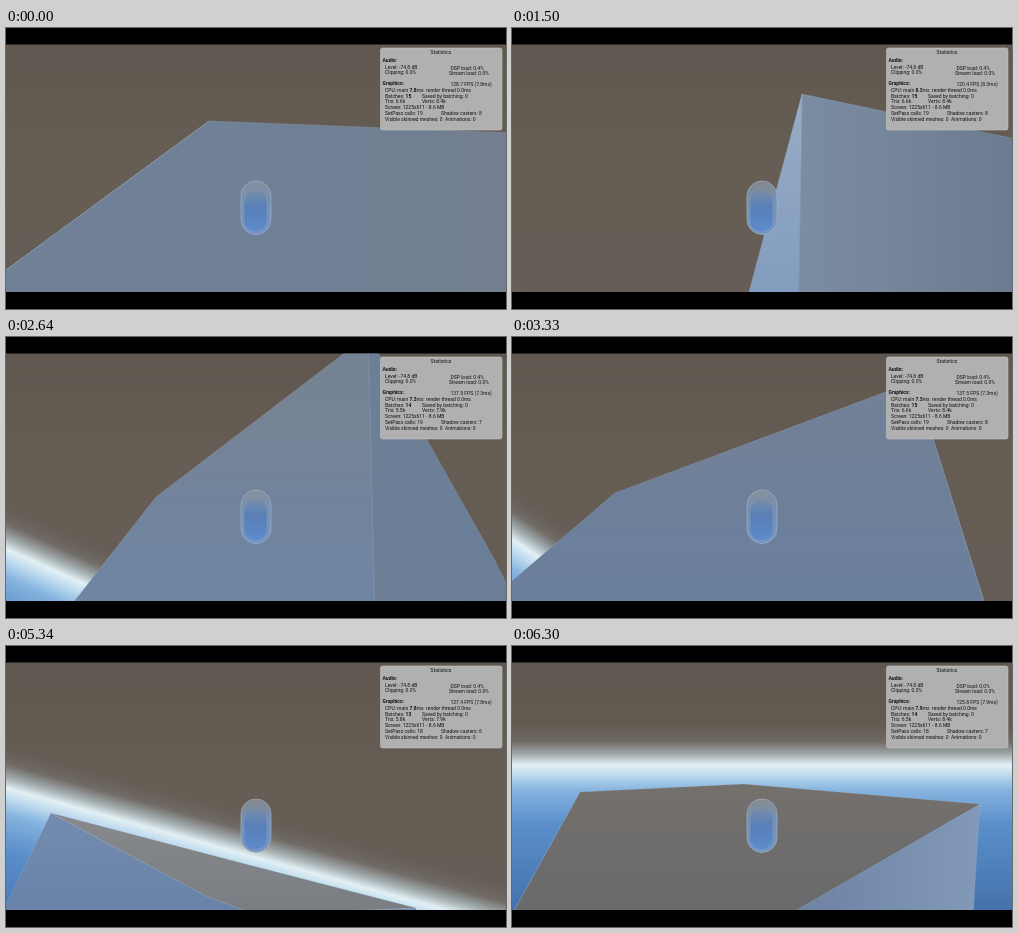
Recreate the animation shown at these times as an HTML page. Size 500 by 281 pixels, loop 6.33 s.

```html
<!DOCTYPE html>
<html lang="en">
<head>
<meta charset="utf-8">
<title>Capsule on a cube</title>
<style>
  html, body { margin: 0; width: 100%; height: 100%; overflow: hidden; background: #000; }
  svg { display: block; width: 100vw; height: 100vh; }
  text { font: 5px Roboto, "Liberation Sans", sans-serif; fill: #111; }
  .bold { font-weight: 700; }
  polygon { stroke: #a6bcd6; stroke-opacity: .28; stroke-width: .8; stroke-linejoin: round; }
</style>
</head>
<body>
<svg viewBox="0 0 500 281">
  <defs>
    <clipPath id="view"><rect y="16.5" width="500" height="247.5"/></clipPath>
    <linearGradient id="ground" x2="0" y2="1">
      <stop stop-color="#5f574f"/><stop offset=".5" stop-color="#665d54"/><stop offset="1" stop-color="#655d56"/>
    </linearGradient>
    <linearGradient id="skyFill" gradientUnits="userSpaceOnUse" x1="0" y1="-45" x2="0" y2="155">
      <stop stop-color="#655d55" stop-opacity="0"/>
      <stop offset=".11" stop-color="#716c67"/>
      <stop offset=".17" stop-color="#a0a9ab"/>
      <stop offset=".225" stop-color="#e2f0f4"/>
      <stop offset=".275" stop-color="#bddaee"/>
      <stop offset=".35" stop-color="#87b4df"/>
      <stop offset=".52" stop-color="#5a8fca"/>
      <stop offset="1" stop-color="#426ea9"/>
    </linearGradient>
    <linearGradient id="leftFill" gradientUnits="userSpaceOnUse" x1="0" y1="60" x2="0" y2="264"><stop/><stop offset="1"/></linearGradient>
    <linearGradient id="rightFill" gradientUnits="userSpaceOnUse" x1="250" y1="0" x2="500" y2="0"><stop/><stop offset="1"/></linearGradient>
    <linearGradient id="topFill" gradientUnits="userSpaceOnUse" x1="0" y1="140" x2="0" y2="264"><stop/><stop offset="1"/></linearGradient>
    <linearGradient id="shell" x2="0" y2="1">
      <stop stop-color="#8b949c" stop-opacity=".75"/><stop offset=".35" stop-color="#7690b3"/><stop offset="1" stop-color="#7495c4"/>
    </linearGradient>
    <linearGradient id="core" x2="0" y2="1">
      <stop stop-color="#6785ad" stop-opacity=".35"/><stop offset=".4" stop-color="#587fb7"/><stop offset="1" stop-color="#5d8bcb"/>
    </linearGradient>
  </defs>
  <g clip-path="url(#view)">
    <rect width="500" height="281" fill="url(#ground)"/>
    <rect id="sky" x="-600" y="-45" width="1700" height="700" fill="url(#skyFill)"/>
    <polygon id="right" fill="url(#rightFill)"/>
    <polygon id="left" fill="url(#leftFill)"/>
    <polygon id="top" fill="url(#topFill)"/>
    <rect x="235" y="153" width="30" height="53.5" rx="15" fill="url(#shell)" stroke="#a3b3c6" stroke-opacity=".75" stroke-width=".9"/>
    <rect x="238.500" y="163" width="22" height="40" rx="10" fill="url(#core)"/>
  </g>
  <rect x="374.500" y="20" width="121.500" height="82" rx="2" fill="#b0b0b0" stroke="#c4c4c4" stroke-width=".6"/>
  <g id="stats"></g>
</svg>
<script>
const LOOP = 6330, STEP = 30;
const $ = id => document.getElementById(id);

// Projected cube corners: l left, a apex, b left foot, s seam foot, q/e right side.
// k, r and m belong to the top face, which stays folded until they leave the l-a edge.
const poses = [
  { t: 0, l: [-60, 286], a: [203, 93], b: [-60, 286], s: [-60, 286], q: [560, 107], e: [560, 300], sky: [400, 20],
    left: [[150, 170, 195], [130, 155, 188]], right: [[111, 128, 151], [115, 127, 143]] },
  { t: 750, l: [108, 294], a: [248, 88], b: [115, 300], s: [140, 294], q: [560, 113], e: [560, 300], sky: [350, 22] },
  { t: 1500, l: [230, 290], a: [290, 66], b: [228, 300], s: [286, 290], q: [560, 123], e: [560, 300], sky: [300, 24],
    left: [[152, 173, 198], [130, 156, 190]], right: [[126, 144, 166], [108, 123, 143]] },
  { t: 2640, l: [150, 160], a: [362, -2], b: [48, 290], s: [369, 290], q: [488, 222], e: [522, 290], sky: [212, 24],
    left: [[118, 131, 148], [110, 133, 163]], right: [[112, 128, 148], [106, 126, 152]] },
  { t: 3330, l: [103, 156], a: [403, 44], b: [-60, 295], s: [480, 290], q: [440, 163], e: [480, 290], sky: [202, 34],
    left: [[114, 129, 150], [106, 127, 157]], right: [[122, 141, 167], [122, 141, 167]] },
  { t: 4290, l: [10, 163], a: [342, 173], b: [-300, 318], s: [328, 290], q: [350, 225], e: [361, 290], sky: [300, 20],
    left: [[108, 126, 150], [112, 132, 160]], right: [[130, 150, 177], [130, 150, 177]], top: [[126, 136, 150], [118, 130, 146]] },
  { t: 5340, l: [45, 167], a: [250, 269], b: [-15, 290], s: [240, 300], q: [412, 280], e: [410, 300], sky: [142, 15.5],
    k: [228, 215], r: [410, 262], m: [200, 250],
    left: [[128, 150, 180], [104, 130, 168]], right: [[120, 142, 174], [120, 142, 174]], top: [[139, 140, 141], [122, 126, 131]] },
  { t: 6300, l: [68, 146], a: [240, 290], b: [-12, 290], s: [240, 295], q: [464, 220], e: [460, 290], sky: [119, 0],
    k: [232, 138], r: [468, 158], m: [-12, 290],
    right: [[106, 126, 158], [134, 157, 188]], top: [[116, 112, 108], [105, 106, 108]] }
];

const mix = (a, b, u) => Array.isArray(a) ? a.map((v, i) => mix(v, b[i], u)) : a + (b - a) * u;

poses.forEach((p, i) => {
  p.k ??= mix(p.l, p.a, .5);
  p.r ??= p.a;
  p.m ??= p.l;
  for (const face of ["left", "right", "top"])
    p[face] ??= i ? poses[i - 1][face] : [[126, 136, 150], [118, 130, 146]];
});

const counters = [
  { t: 0, fps: "128.7", ms: "7.8", batches: 15, tris: "6.6k", verts: "8.4k", calls: 19, casters: 8, load: "0.4" },
  { t: 780, fps: "120.4", ms: "8.3" },
  { t: 2070, fps: "137.5", ms: "7.3", batches: 14, tris: "5.5k", verts: "7.9k", casters: 7 },
  { t: 2760, batches: 15, tris: "6.6k", verts: "8.4k", casters: 8 },
  { t: 4080, fps: "127.4", ms: "7.8" },
  { t: 4950, batches: 13, tris: "5.8k", verts: "7.9k", calls: 18, casters: 6 },
  { t: 5760, fps: "125.8", ms: "7.9", batches: 14, tris: "6.5k", verts: "8.4k", casters: 7, load: "0.0" }
];
counters.forEach((c, i) => { if (i) counters[i] = { ...counters[i - 1], ...c }; });

const label = (x, y, content, attrs = "") => `<text x="${x}" y="${y}" ${attrs}>${content}</text>`;
const bold = v => `<tspan class="bold">${v}</tspan>`;

function statsMarkup(c) {
  return [
    label(435, 26.3, "Statistics", 'text-anchor="middle"'),
    label(376.5, 33.8, "Audio:", 'class="bold"'),
    label(379, 41, "Level: -74.8 dB"),
    label(444.5, 41.5, `DSP load: ${c.load}%`),
    label(379, 46.3, "Clipping: 0.0%"),
    label(443, 46.5, "Stream load: 0.0%"),
    label(376.5, 56.8, "Graphics:", 'class="bold"'),
    label(444.5, 57.8, `${c.fps} FPS (${c.ms}ms)`),
    label(379, 63.8, `CPU: main ${bold(c.ms)}ms &#160;render thread 0.0ms`),
    label(379, 69.6, `Batches: ${bold(c.batches)}`),
    label(416, 69.6, "Saved by batching: 0"),
    label(379, 75.2, `Tris: ${c.tris}`),
    label(416, 75.2, `Verts: ${c.verts}`),
    label(379, 80.9, "Screen: 1225x611 - 8.6 MB"),
    label(379, 86.7, `SetPass calls: ${c.calls}`),
    label(435, 86.7, `Shadow casters: ${c.casters}`),
    label(379, 92.5, "Visible skinned meshes: 0 &#160;Animations: 0")
  ].join("");
}

function paint(face, points, colors) {
  $(face).setAttribute("points", points.map(p => p.map(v => v.toFixed(2))).join(" "));
  [...$(face + "Fill").children].forEach((stop, i) =>
    stop.setAttribute("stop-color", `rgb(${colors[i].map(Math.round)})`));
}

let shown;

function render(t) {
  const i = Math.max(1, poses.findIndex(p => p.t >= t));
  const from = poses[i - 1], to = poses[i];
  const u = (t - from.t) / (to.t - from.t);
  const at = name => mix(from[name], to[name], u);
  const [l, a, b, s, q, e, k, r, m] = [..."labsqekrm".replace("lab", "lab")].map(at);

  paint("left", [l, m, a, s, b], at("left"));
  paint("right", [r, a, s, e, q], at("right"));
  paint("top", [l, k, r, a, m], at("top"));
  $("top").style.display = t > 4290 ? "" : "none";

  const [height, angle] = at("sky");
  $("sky").setAttribute("transform", `translate(0 ${height}) rotate(${angle})`);

  const current = counters.findLast(c => c.t <= t);
  if (current !== shown) {
    $("stats").innerHTML = statsMarkup(current);
    shown = current;
  }
}

const start = performance.now();
function tick() {
  const t = (performance.now() - start) % LOOP;
  render(Math.floor(t / STEP) * STEP);
  requestAnimationFrame(tick);
}
render(0);
requestAnimationFrame(tick);
</script>
</body>
</html>
```
